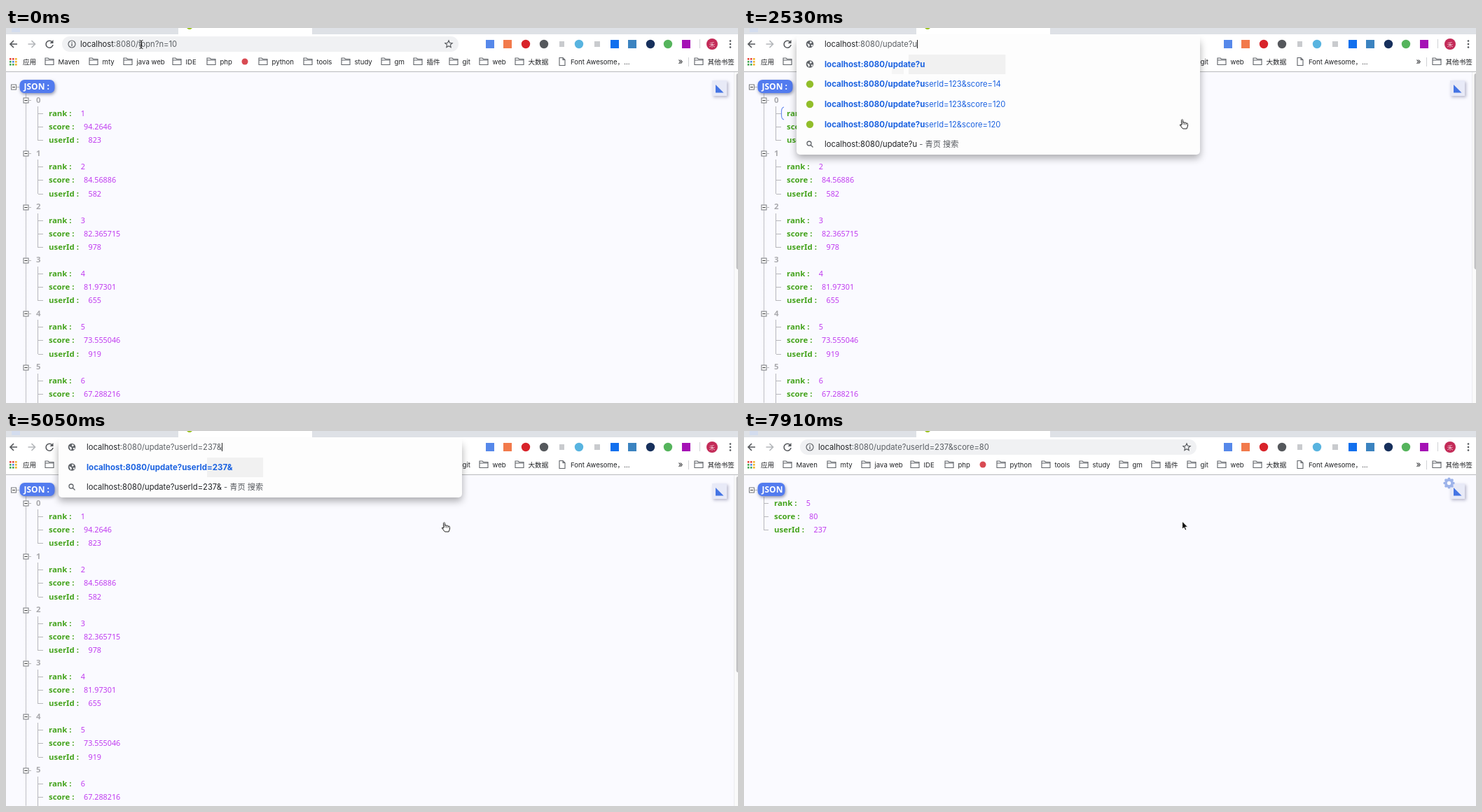
Animation of 1045 by 536 pixels, one loop 8000 ms. Source, as an HTML page with a canvas:

```html
<!DOCTYPE html>
<html lang="zh">
<head>
<meta charset="utf-8">
<style>
  html, body { margin: 0; width: 100%; height: 100%; overflow: hidden; background: #fff; }
  canvas { display: block; }
</style>
</head>
<body>
<canvas id="stage" width="1045" height="536"></canvas>
<script>
const ctx = document.getElementById('stage').getContext('2d');
const LOOP = 8000, PAGE = '#fafaff', BLUE = '#1b62e0', INK = '#202225', GREY = '#5c6065', LINE = '#b8b8bc';
const SANS = 'Inter, "Noto Sans CJK SC", "Noto Sans CJK", sans-serif';
const URL_FONT = '11.2px ' + SANS, URL_BOLD = '700 11.5px ' + SANS, MARK_FONT = '9.6px ' + SANS;
const KEY_FONT = '800 11.4px "Noto Sans", sans-serif', VALUE_FONT = '500 10.8px "Noto Sans", sans-serif';

const HOST = 'localhost', PATH = ':8080/', QUERY = 'update?userId=237&score=80';
const HISTORY = ['123&score=14', '123&score=120', '12&score=120'].map(s => 'update?userId=' + s);
// [time, characters of the query typed so far]
const TYPING = [[1190, 1], [1340, 2], [1490, 3], [1640, 4], [1780, 5], [1930, 6], [2230, 7],
  [2530, 8], [2670, 11], [2970, 12], [3120, 13], [3270, 14], [3710, 15], [3860, 16], [4460, 17],
  [4900, 18], [5500, 19], [5650, 20], [5800, 21], [5950, 22], [6100, 23], [6540, 24], [6840, 26]];
const RECORDS = [['94.2646', 823], ['84.56886', 582], ['82.365715', 978],
  ['81.97301', 655], ['73.555046', 919], ['67.288216', 0]];
const FOLDERS = [[62, 'Maven'], [125, 'mty'], [174, 'java web'], [244, 'IDE'], [293, 'php'],
  [367, 'python'], [431, 'tools'], [485, 'study'], [542, 'gm'], [588, '插件'], [639, 'git'],
  [682, 'web'], [733, '大数据'], [989, '其他书签']];

function rect(x, y, w, h, color) {
  ctx.fillStyle = color;
  ctx.fillRect(x, y, w, h);
}
function disc(x, y, r, color) {
  ctx.fillStyle = color;
  ctx.beginPath();
  ctx.arc(x, y, r, 0, 7);
  ctx.fill();
}
function round(x, y, w, h, r, color) {
  ctx.fillStyle = color;
  ctx.beginPath();
  ctx.roundRect(x, y, w, h, r);
  ctx.fill();
}
function stroke(d, color, width = 1, x = 0, y = 0) {
  ctx.save();
  ctx.translate(x, y);
  ctx.strokeStyle = color;
  ctx.lineWidth = width;
  ctx.stroke(new Path2D(d));
  ctx.restore();
}
function fill(d, color, x = 0, y = 0) {
  ctx.save();
  ctx.translate(x, y);
  ctx.fillStyle = color;
  ctx.fill(new Path2D(d));
  ctx.restore();
}
// Draws text around a vertical middle and returns its right end.
function text(s, x, middle, color, font) {
  ctx.font = font;
  ctx.fillStyle = color;
  ctx.fillText(s, x, middle + 4);
  return x + ctx.measureText(s).width;
}
function shadowed(color, blur, dx, dy, draw) {
  ctx.save();
  Object.assign(ctx, { shadowColor: color, shadowBlur: blur, shadowOffsetX: dx, shadowOffsetY: dy });
  draw();
  ctx.restore();
}

function folder(x, y) {
  stroke('M-6 -4.5h4l1.5 1.5h6.5v8h-12zM-6 -1.5h12', '#5f6368', 1.1, x, y - .5);
}
function globe(y) {
  disc(94, y, 5.3, '#5f6368');
  fill('M-4 -1l3 1 1 2-1.5 2.5zM0 -4l3 1-1 2-2 0zM1.5 1h3l-1.5 3z', '#fff', 94, y);
}
function urlText(x, query) {
  return text(PATH + query, text(HOST, x, 23, INK, URL_FONT), 23, GREY, URL_FONT);
}

function toolbar() {
  rect(0, 0, 1045, 63, '#fff');
  rect(0, 0, 1045, 9, '#dee1e6');
  rect(8, 0, 12, 6, '#d3dcee');
  round(246, -8, 191, 17, [8, 8, 0, 0], '#fff');
  disc(262, -2.5, 4.5, '#9bc31c');
  rect(0, 62, 1045, 1, '#b9babd');

  stroke('M5 0H-5M0 -5L-5 0L0 5', '#54575b', 1.6, 11, 23);
  stroke('M-5 0H5M0 -5L5 0L0 5', '#b4b7ba', 1.6, 36.5, 23);
  stroke('M3.7 -3.2A5 5 0 1 0 5 1', '#54575b', 1.6, 62, 23);
  fill('M5.5 -6v5h-5z', '#54575b', 62, 23);

  for (const [x, color] of [[691, '#5688ea'], [716, '#f27a4b'], [869, '#1270ee'],
    [894, '#3b83c0'], [971, '#a512b5']]) rect(x - 6, 17, 12, 12, color);
  for (const [x, color] of [[742, '#d8232a'], [768, '#55585c'], [818, '#58b4e0'],
    [920, '#17305c'], [945, '#55b45c']]) disc(x, 23, 6.2, color);
  rect(790, 19, 7, 8, '#c9cbce');
  rect(840, 19, 8, 8, '#c9cbce');
  rect(990, 16, 1, 13, '#d0d2d5');
  disc(1008, 23, 8, '#c32b58');
  text('禾', 1003.7, 22.5, '#f3cdd8', '8.5px ' + SANS);
  for (const y of [18.5, 23, 27.5]) disc(1034, y, 1.3, '#54575b');

  const dots = ['#e5453a', '#e5453a', '#f0b429', '#45a853', '#4a86e8', '#f0b429', '#45a853', '#45a853', '#f0b429'];
  dots.forEach((color, i) => rect(5 + i % 3 * 4, 43 + (i / 3 | 0) * 4, 2.6, 2.6, color));
  text('应用', 24, 48, INK, MARK_FONT);
  for (const [x, name] of FOLDERS) {
    folder(x, 48);
    text(name, x + 12.5, 48, INK, MARK_FONT);
  }
  disc(341, 48, 4.5, '#d84a52');
  stroke('M-4 -5.5h5l3 3v8h-8zM1 -5.5v3h3', '#5f6368', 1.1, 794, 48);
  text('Font Awesome，…', 806, 48, INK, MARK_FONT);
  text('»', 959.5, 47.5, INK, '12px ' + SANS);
  rect(974, 42, 1, 13, '#d0d2d5');
}

function addressBar(query, focused) {
  round(80, 12, 566, 22, 11, focused ? '#fff' : '#f0f1f3');
  if (focused) {
    ctx.strokeStyle = '#5b97f0';
    ctx.lineWidth = 2;
    ctx.stroke();
    ctx.font = URL_FONT;
    const start = 106 + ctx.measureText(HOST + PATH).width;
    rect(start, 16, ctx.measureText(query).width, 14, '#b5d6fd');
  }
  ctx.beginPath();
  ctx.arc(94, 23, 5, 0, 7);
  ctx.strokeStyle = '#5f6368';
  ctx.lineWidth = 1.2;
  ctx.stroke();
  rect(93.4, 22, 1.3, 4, '#5f6368');
  rect(93.4, 20, 1.3, 1.3, '#5f6368');
  urlText(106, query);
  stroke('M0 -5.2L1.5 -1.7 5.2 -1.4 2.4 1 3.2 4.6 0 2.7-3.2 4.6-2.4 1-5.2 -1.4-1.5 -1.7z', '#54575b', 1.1, 632, 23);
}

function keyValue(x, y, key, value, gap) {
  text(key + ' :', x, y, '#44a31c', KEY_FONT);
  text(value, x + gap, y, '#c03cf0', VALUE_FONT);
}
function record(x, y, rank, score, userId) {
  keyValue(x, y, 'rank', rank, 45.7);
  keyValue(x, y + 19.08, 'score', score, 50);
  keyValue(x, y + 38.16, 'userId', userId, 56.5);
  for (let i = 0; i < 3; i++) rect(x - 15, Math.round(y + i * 19.08), 7, 1, LINE);
}
function expander(x, y) {
  rect(x - 4, y - 4, 8, 8, '#77797d');
  rect(x - 3, y - 3, 6, 6, '#fff');
  rect(x - 2, y - .5, 4, 1, '#333');
}
function dotted(x, top, bottom) {
  ctx.setLineDash([1, 1]);
  stroke(`M${x + .5} ${top}V${bottom}`, '#85858a');
  ctx.setLineDash([]);
}
function rootLabel(label, width) {
  expander(11, 84.5);
  rect(15, 84, 4, 1, LINE);
  shadowed('rgba(60,70,110,.55)', 4, 1, 2, () => round(19.5, 74, width, 19, 7, '#527bef'));
  text(label, 25.5, 83.5, '#fff', '800 12px "Noto Sans", sans-serif');
}
function cornerButton() {
  shadowed('rgba(60,60,110,.35)', 4, 2, 2, () => rect(1008, 75, 21, 22, '#e8eaf7'));
  fill('M1013 81V92.5H1024.5z', '#4474e4');
}
function gear() {
  for (let i = 0; i < 8; i++) {
    const a = i * Math.PI / 4;
    disc(1006.5 + 6 * Math.cos(a), 74.5 + 6 * Math.sin(a), 2.1, '#9db3ea');
  }
  disc(1006.5, 74.5, 6, '#9db3ea');
  disc(1006.5, 74.5, 2.7, PAGE);
}

function listPage() {
  dotted(28, 94, 536);
  RECORDS.forEach(([score, userId], n) => {
    const y = 103 + n * 76.32;
    expander(28.5, Math.round(y) + .5);
    rect(33, Math.round(y), 3, 1, LINE);
    text(n, 43, y - .5, '#a9a9ad', KEY_FONT);
    rect(45, Math.round(y + 9), 1, 49, LINE);
    record(61, y + 19.08, n + 1, score, userId);
  });
  rootLabel('JSON :', 50);
  cornerButton();
  rect(1039, 63, 1, 473, '#ececf0');
  rect(1040, 63, 5, 473, '#fafafa');
  round(1042.5, 65, 6, 280, 3, '#c2c2c4');
}
function resultPage(t) {
  rect(28, 94, 1, 48, LINE);
  record(43, 103, 5, 80, 237);
  rootLabel('JSON', 39);
  cornerButton();
  if (t >= 7600) gear();
}

function popup(count, t) {
  const typed = QUERY.slice(0, count);
  const history = count < 15 ? HISTORY : [];
  const bottom = history.length ? 181 : 95;
  shadowed('rgba(0,0,0,.32)', 11, 0, 5, () => round(75, 14, 576, bottom - 14, 5, '#fdfdfd'));
  rect(75, 10, 576, 8, '#fdfdfd');

  const searchY = bottom - 15;
  const inputEnd = urlText(115, typed);
  rect(Math.round(inputEnd), 17, 1, 12, '#222');

  let x = text(HOST + PATH + typed, 115, searchY, INK, URL_FONT);
  const right = text(' - 青页 搜索', x, searchY, '#55585d', URL_FONT);
  stroke('M1.3 1.3L4.5 4.5M2 -1A3 3 0 1 1 -4 -1A3 3 0 1 1 2 -1', '#5f6368', 1.3, 94, searchY);

  let widest = right;
  history.forEach((entry, i) => {
    const y = 80.3 + i * 28.7;
    disc(94, y, 5.2, '#92be2b');
    x = text(HOST + PATH + typed, 115, y, BLUE, URL_BOLD);
    widest = Math.max(widest, text(entry.slice(count), x, y, BLUE, URL_FONT));
  });

  const shadeFrom = t < 3710 ? (t >= 2230 ? 235 : 0) : (t >= 3860 ? 287 : 0);
  if (shadeFrom) rect(shadeFrom, 38, widest - shadeFrom, 28, '#f1f1f1');
  if (t >= 1490 && t < 3710) rect(211, 57, 17, 9, '#f5f5f5');
  globe(23);
  globe(51.5);
  text(HOST + PATH + typed, 115, 51.5, BLUE, URL_BOLD);
}

function outlined(d, x, y, body, line) {
  fill(d, body, x, y);
  stroke(d, line, 1, x, y);
}
function pointer(t) {
  if (t < 150) {
    stroke('M-2.5 -6Q0 -6 0 -4V4Q0 6 -2.5 6M2.5 -6Q0 -6 0 -4V4Q0 6 2.5 6M-1.5 1H1.5', '#222', 1, 193, 23.5);
  } else if (t >= 600 && t < 7130) {
    outlined('M-3.5 2V-5.5Q-2.5 -7.5 -1.5 -5.5V-2Q0 -3 1 -1.7Q2.5 -2.5 3.3 -1Q5.5 -1.5 5.5 .5V3L4 7H-1.5L-5.5 2Q-6 0 -3.5 2z', 628, 137, '#fff', '#222');
    stroke('M-1.5 -2V1M1 -1.5V1.5M3.3 -1V1.5', '#222', .8, 628, 137);
  } else if (t >= 7130) {
    outlined('M0 0V11.5L2.6 9L4.3 13L6.3 12.2L4.6 8.3H8.2z', 625.5, 129, '#111', '#fff');
  }
}

function draw(t) {
  const step = TYPING.findLast(([start]) => t >= start);
  const loading = t >= 7130;
  rect(0, 0, 1045, 536, PAGE);
  if (t < 7280) listPage();
  else if (t >= 7440) resultPage(t);
  if (t >= 600 && t < 3710) stroke('M57 113Q53.5 114 53.5 119V125Q53.5 130 57 131', '#6d8eee', 1.2);
  toolbar();
  if (step && !loading) popup(step[1], t);
  else addressBar(loading ? QUERY : 'topn?n=10', t >= 450 && !loading);
  pointer(t);
}

function tick() {
  draw(performance.now() % LOOP);
  requestAnimationFrame(tick);
}
tick();
</script>
</body>
</html>
```
